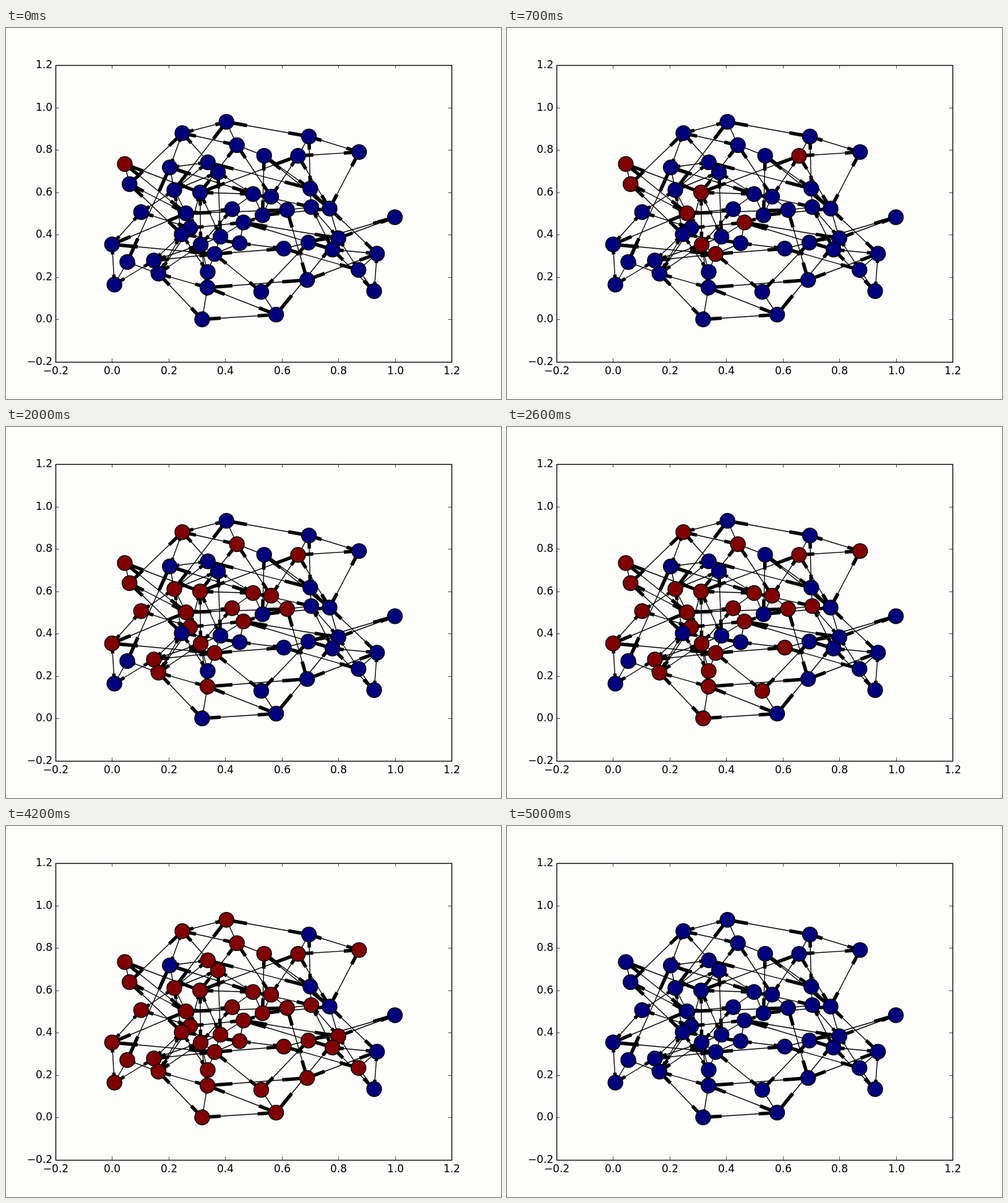
Write an HTML page with a canvas that moves like this. It is 800 px wide and 600 px high and loops after 5100 ms.

```html
<!DOCTYPE html>
<html lang="en">
<head>
<meta charset="utf-8">
<title>Spreading on a network</title>
<style>
  html, body { margin: 0; width: 100%; height: 100%; overflow: hidden; background: #fdfdfc; }
  canvas { display: block; }
</style>
</head>
<body>
<canvas id="plot" width="800" height="600"></canvas>
<script>
const ctx = document.getElementById('plot').getContext('2d');
const STEP = 100, LOOP = 5100;
const HEALTHY = '#00007d', INFECTED = '#800000';

const nodes = {
  A: [192, 220], B: [199.7, 252.5], C: [218.3, 297.8], D: [171.4, 350], E: [196, 378.5],
  F: [175.2, 415], G: [239, 376], H: [246.5, 397.3], I: [284, 333.5], J: [297.7, 323.5],
  K: [291, 299.7], L: [272, 262], M: [264.7, 225.5], N: [285, 170], O: [356.3, 151.7],
  P: [373.2, 189.5], Q: [326.2, 217.2], R: [342.6, 233.5], S: [313.7, 266], T: [365.5, 293],
  U: [399.3, 268.5], V: [428.5, 272.8], W: [417.2, 206.6], X: [472, 206.8], Y: [489.6, 175.5],
  Z: [570.6, 200.6], a: [491.8, 259.8], b: [493.4, 289.6], c: [523, 292], d: [454.2, 294.3],
  e: [414.6, 302.7], f: [383.8, 314.5], g: [346.6, 337.5], h: [377.6, 348], i: [314.6, 350.5],
  j: [337.2, 365.5], k: [326, 394.6], l: [325.6, 419.8], m: [317, 471.2], n: [412.5, 426.7],
  o: [436.6, 463.5], p: [486.7, 407.5], q: [449, 356.7], r: [488.7, 347], s: [527.7, 358.2],
  t: [537.2, 340], u: [569.7, 391.2], v: [595, 425.5], w: [599.6, 365], x: [628.5, 306]
};

// Neighbours of each node; every link is listed once.
const links = {
  A: 'BSK', B: 'NKI', C: 'JDL', D: 'FKj', E: 'HMF', F: 'G', G: 'Iij',
  H: 'mliIJ', I: 'Lkh', J: 'Sf', K: 'LTd', L: 'MQRO', M: 'NQU', N: 'OPR',
  O: 'PY', P: 'WSV', Q: 'a', R: 'gU', S: 'UiXg', T: 'Ufi', U: 'eb',
  V: 'Xde', W: 'eac', X: 'YZc', Y: 'Za', Z: 'c', a: 'bc', b: 'dts',
  c: 'wt', d: 'pf', e: 'fc', f: 'ths', g: 'fji', h: 'jq', i: 'jkl',
  j: 'kqn', k: 'l', l: 'mpo', m: 'o', n: 'or', o: 't', p: 'w',
  q: 'ru', r: 'xt', s: 'vw', t: 'xu', u: 'vw', v: 'w'
};

const infectionOrder = [...'ABSKijfXLJDVdPlCGHUTNZbqkmnRQOIghertEFWsopuYMacwvx'];

function line(x1, y1, x2, y2, width) {
  ctx.lineWidth = width;
  ctx.beginPath();
  ctx.moveTo(x1, y1);
  ctx.lineTo(x2, y2);
  ctx.stroke();
}

function drawLink([x1, y1], [x2, y2]) {
  const dx = (x2 - x1) / 4, dy = (y2 - y1) / 4;
  line(x1, y1, x2, y2, 1.39);
  line(x1, y1, x1 + dx, y1 + dy, 5.56);
  line(x2, y2, x2 - dx, y2 - dy, 5.56);
}

function drawNode([x, y], color) {
  ctx.beginPath();
  ctx.arc(x, y, 12, 0, 2 * Math.PI);
  ctx.fillStyle = color;
  ctx.fill();
  ctx.lineWidth = 1.39;
  ctx.stroke();
}

function drawAxes() {
  ctx.lineWidth = 1.39;
  ctx.strokeRect(80.5, 60.5, 640, 480);
  ctx.font = '17px "DejaVu Sans", sans-serif';
  ctx.fillStyle = '#000';
  for (let i = 0; i < 8; i++) {
    const label = ((i - 1) / 5).toFixed(1).replace('-', '\u2212');
    const x = Math.round(80 + i * 640 / 7) + 0.5;
    const y = Math.round(540 - i * 480 / 7) + 0.5;
    line(x, 540, x, 534.5, 0.7);
    line(x, 60, x, 65.5, 0.7);
    line(80, y, 85.5, y, 0.7);
    line(720, y, 714.5, y, 0.7);
    ctx.textAlign = 'center';
    ctx.fillText(label, x, 560);
    ctx.textAlign = 'right';
    ctx.fillText(label, 75, y + 4.5);
  }
}

function draw(now) {
  const infected = Math.floor(now % LOOP / STEP) + 1;
  // With every node infected, the colour scale falls back to its low end.
  const saturated = infected >= infectionOrder.length;

  ctx.fillStyle = '#fdfdfc';
  ctx.fillRect(0, 0, 800, 600);
  ctx.strokeStyle = '#000';
  drawAxes();
  for (const from in links)
    for (const to of links[from]) drawLink(nodes[from], nodes[to]);
  infectionOrder.forEach((name, i) =>
    drawNode(nodes[name], i < infected && !saturated ? INFECTED : HEALTHY));
  requestAnimationFrame(draw);
}
requestAnimationFrame(draw);
</script>
</body>
</html>
```
